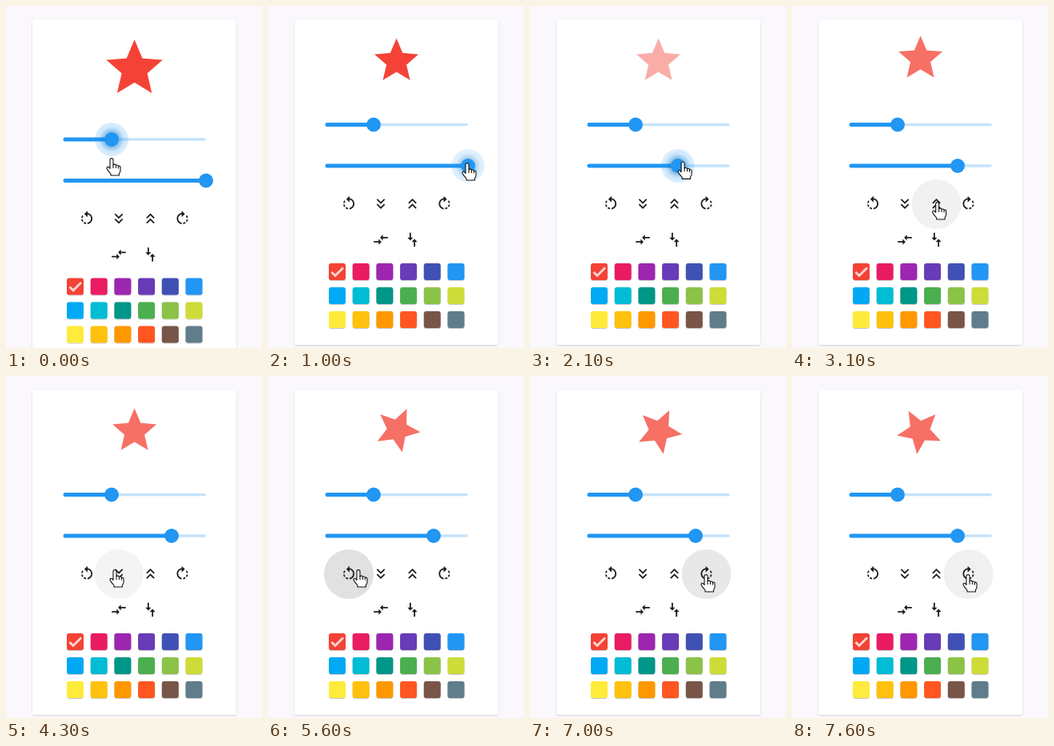
Recreate the animation shown at these times as an HTML page. Size 320 by 428 pixels, loop 8 s.

```html
<!DOCTYPE html>
<html lang="en">
<head>
<meta charset="utf-8">
<title>Star editor</title>
<style>
html, body { margin: 0; width: 100%; height: 100%; overflow: hidden; background: #faf8fc; }
svg { display: block; width: 320px; height: 428px; }
</style>
</head>
<body>
<svg id="stage" viewBox="0 0 320 428">
  <defs>
    <radialGradient id="glow">
      <stop offset=".35" stop-color="#1878c0" stop-opacity=".6"/>
      <stop offset=".75" stop-color="#2196f3" stop-opacity=".22"/>
      <stop offset="1" stop-color="#2196f3" stop-opacity=".15"/>
    </radialGradient>
    <filter id="soft" x="-10%" y="-10%" width="120%" height="120%">
      <feDropShadow dx="0" dy="1" stdDeviation="1" flood-opacity=".16"/>
    </filter>
    <filter id="edge" x="-20%" y="-20%" width="140%" height="140%">
      <feDropShadow dx="0" dy=".8" stdDeviation=".7" flood-opacity=".28"/>
    </filter>
  </defs>
  <rect id="card" x="33" y="17.5" width="255" rx="3" fill="#fff" filter="url(#soft)"/>
  <path id="star" fill="#f44336" d="M12 17.27 18.18 21l-1.64-7.03L22 9.24l-7.19-.61L12 2 9.19 8.63 2 9.24l5.46 4.73L5.82 21z"/>
  <g id="controls"></g>
  <g id="cursor" stroke="#111" stroke-width="1.1" stroke-linejoin="round" stroke-linecap="round">
    <path fill="#fff" d="M-2 12.5V1.6a2 2 0 0 1 4 0V7.5q2.6-1 3.4.7 2.4-.7 3 1 2.6-.4 2.6 2V15q0 2-1.6 3.6V21H-1V19Q-5 14.5-6 12.2-6 9.6-3.6 10.6z"/>
    <path fill="none" d="M2 7.5v4M5.4 8.5v3M8.4 9.5v2.5"/>
  </g>
</svg>
<script>
const LOOP = 8000, STEP = 100, LAST = 7600;
const TRACK_LEFT = 72, TRACK_WIDTH = 178;
const $ = id => document.getElementById(id);
const controls = $('controls');

function add(tag, attrs, parent = controls) {
  const el = document.createElementNS('http://www.w3.org/2000/svg', tag);
  parent.append(el);
  return set(el, attrs);
}
function set(el, attrs) {
  for (const key in attrs) el.setAttribute(key, attrs[key]);
  return el;
}

function makeSlider(y) {
  const line = { x1: TRACK_LEFT + 2, y1: y, y2: y, 'stroke-linecap': 'round' };
  add('line', { ...line, x2: TRACK_LEFT + TRACK_WIDTH - 2, stroke: '#c5e3fb', 'stroke-width': 3.6 });
  const fill = add('line', { ...line, stroke: '#2196f3', 'stroke-width': 5 });
  const halo = add('circle', { cy: y, r: 21, fill: 'url(#glow)' });
  const thumb = add('circle', { cy: y, r: 9, fill: '#2196f3' });
  return (x, pressed) => {
    set(fill, { x2: x });
    set(halo, { cx: x, opacity: pressed });
    set(thumb, { cx: x });
  };
}
const sizeSlider = makeSlider(82.5);
const opacitySlider = makeSlider(134);

const rotateIcon = 'M7.11 8.53 5.7 7.11C4.8 8.27 4.24 9.61 4.07 11h2.02c.14-.87.49-1.72 1.02-2.47zM6.09 13H4.07c.17 1.39.72 2.73 1.62 3.89l1.41-1.42c-.52-.75-.87-1.59-1.01-2.47zm1.01 5.32c1.16.9 2.51 1.44 3.9 1.61V17.9c-.87-.15-1.71-.49-2.46-1.03L7.1 18.32zM13 4.07V1L8.45 5.55 13 10V6.09c2.84.48 5 2.94 5 5.91s-2.16 5.43-5 5.91v2.02c3.95-.49 7-3.85 7-7.93s-3.05-7.44-7-7.93z';
const chevronIcon = 'M18 6.41 16.59 5 12 9.58 7.41 5 6 6.41l6 6zM18 13.41 16.59 12 12 16.58 7.41 12 6 13.41l6 6z';
const flipIcon = 'M9.01 14H2v2h7.01v3L13 15l-3.99-4v3zM14.99 13v-3H22V8h-7.01V5L11 9l3.99 4z';

// Each press is [start, end] in ms.
const press = { up: [3000, 3390], down: [3850, 4240], left: [4873, 5600], right: [6552, 7540] };
const buttons = [
  [101, 181.5, rotateIcon, '', press.left],
  [141, 181.5, chevronIcon, '', press.down],
  [180.5, 181.5, chevronIcon, 'scale(1 -1)', press.up],
  [220.5, 181.5, rotateIcon, 'scale(-1 1)', press.right],
  [141, 226.5, flipIcon, ''],
  [180.5, 226.5, flipIcon, 'rotate(90)']
];
const ripples = [];
for (const [cx, cy, , , span] of buttons) {
  if (span) ripples.push({ span, el: add('circle', { cx, cy: cy + .5, r: 31 }) });
}
for (const [x, y, d, turn] of buttons) {
  add('path', { d, fill: '#1c1c1e', transform: `translate(${x} ${y}) ${turn} scale(.88) translate(-12 -12)` });
}

const palette = 'f44336 e91e63 9c27b0 673ab7 3f51b5 2196f3 03a9f4 00bcd4 009688 4caf50 8bc34a cddc39 ffeb3b ffc107 ff9800 ff5722 795548 607d8b';
palette.split(' ').forEach((color, i) => add('rect', {
  x: 76 + i % 6 * 29.7, y: 256 + Math.floor(i / 6) * 30,
  width: 21, height: 21, rx: 3, fill: '#' + color, filter: 'url(#edge)'
}));
add('path', { d: 'M79.5 267l4.5 4.5 10-10', fill: 'none', stroke: '#ffd3cf', 'stroke-width': 3 });

const clamp = x => Math.min(1, Math.max(0, x));
const ramp = (t, [from, to]) => clamp((t - from) / (to - from));
const smooth = x => x * x * (3 - 2 * x);

// Keys are [time, ...values], eased between neighbours.
function follow(keys, t) {
  let i = 0;
  while (i < keys.length - 2 && t >= keys[i + 1][0]) i++;
  const [a, b] = [keys[i], keys[i + 1]];
  const k = smooth(ramp(t, [a[0], b[0]]));
  return a.slice(1).map((v, n) => v + (b[n + 1] - v) * k);
}

const thumbKeys = [[1050, 250], [1650, 107], [2400, 227], [2650, 207]];
const cursorKeys = [
  [0, 132, 191], [300, 132, 191], [800, 249, 197], [1050, 249, 197],
  [1650, 112, 196], [2400, 234, 195], [2650, 212, 195], [2950, 181, 246],
  [3600, 186, 246], [3800, 138, 243], [4240, 136, 243], [4350, 136, 243],
  [4600, 102, 246], [5500, 104, 246], [5600, 113, 243], [6400, 220, 249]
];

function rippleOpacity(t, [start, end]) {
  if (t < start) return 0;
  const held = Math.min(t, end) - start;
  const level = Math.min(.12, .045 + held * .0001);
  return level * (1 - ramp(t, [end, end + 120]));
}

function draw(t) {
  const size = 66 + 18.5 * (1 - ramp(t, [0, 300])) ** 2;
  set($('card'), { height: 340.5 + size });
  set(controls, { transform: `translate(0 ${size})` });

  const thumb = follow(thumbKeys, t)[0];
  sizeSlider(132, 1 - ramp(t, [150, 350]));
  opacitySlider(thumb, ramp(t, [850, 1050]) * (1 - ramp(t, [2650, 2850])));

  const lift = 13 * (ramp(t, press.down) - ramp(t, press.up));
  const angle = 163 * ramp(t, press.right) - 120 * ramp(t, press.left);
  const laggedThumb = follow(thumbKeys, t - 150)[0];
  set($('star'), {
    opacity: (laggedThumb - TRACK_LEFT) / TRACK_WIDTH,
    transform: `translate(160.6 ${35 + size / 2 + lift}) rotate(${angle}) scale(${size / 24}) translate(-12 -12)`
  });

  for (const { el, span } of ripples) set(el, { opacity: rippleOpacity(t, span) });
  const [x, y] = follow(cursorKeys, t);
  set($('cursor'), { transform: `translate(${x} ${y})` });
}

function tick() {
  const t = performance.now() % LOOP;
  draw(Math.min(LAST, Math.floor(t / STEP) * STEP));
  requestAnimationFrame(tick);
}
tick();
</script>
</body>
</html>
```
